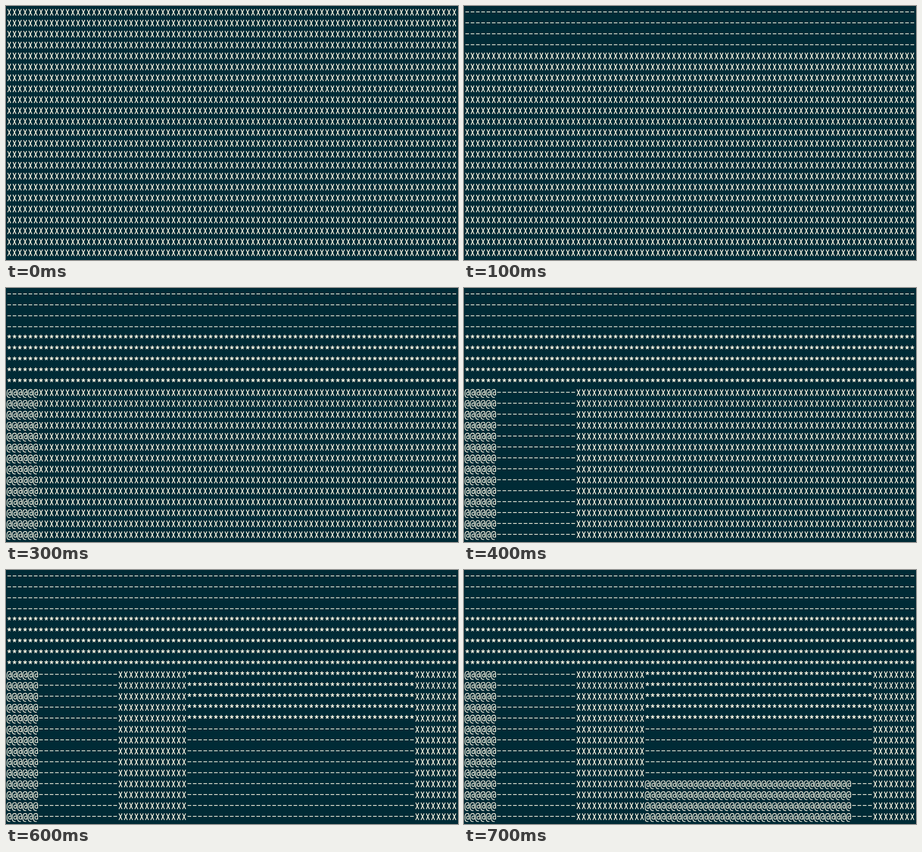
An HTML page with a canvas that plays this animation: 998x561 px, repeating every 1.7 s.

```html
<!DOCTYPE html>
<html lang="en">
<head>
<meta charset="utf-8">
<title>Terminal layout fill</title>
<style>
  html, body { margin: 0; width: 100%; height: 100%; overflow: hidden; background: #002b36; }
  canvas { display: block; }
</style>
</head>
<body>
<canvas id="stage" width="998" height="561"></canvas>
<script>
const ctx = document.getElementById("stage").getContext("2d");
const COLS = 85, ROWS = 23;
const CELL = { x: 7.1, y: 13.8, width: 11.7, height: 24.14 };
const STEP_MS = 100, LOOP_MS = 1700;

// Narrow terminal letterforms, drawn around the centre of a cell.
const glyphs = {
  "X": { width: 1.75, path: "M-3.4-7.2L3.4 7.3M3.4-7.2L-3.4 7.3" },
  "-": { width: 1.7, path: "M-4-.7H4" },
  "*": { width: 1.9, path: "M0-3.1V-7.2M0-3.1L-4-4.4M0-3.1L4-4.4M0-3.1L-2.5.5M0-3.1L2.5.5" },
  "@": { width: 1.6, path: "M4.2 6V-2.5C4.2-5.6 2.8-7 .3-7C-3-7-4.7-4.7-4.7-.8V5C-4.7 8.8-3 10.6.2 10.6H2.2" +
    "M4.2-1.4H2.2C-.3-1.4-1.3-.2-1.3 2C-1.3 4.6-.4 5.6 1.5 5.6C3.1 5.6 4.2 4.5 4.2 2.8" }
};
for (const glyph of Object.values(glyphs)) glyph.path = new Path2D(glyph.path);

// Each step fills one region: character, column, row, columns, rows.
const fills = [
  ["X", 0, 0, COLS, ROWS],
  ["-", 0, 0, COLS, 4],
  ["*", 0, 4, COLS, 5],
  ["@", 0, 9, 6, 14],
  ["-", 6, 9, 15, 14],
  ["-", 34, 9, 43, 14],
  ["*", 34, 9, 43, 5],
  ["@", 34, 19, 39, 4]
];

function layout(lastStep) {
  const grid = Array.from({ length: ROWS }, () => Array(COLS));
  for (const [char, left, top, width, height] of fills.slice(0, lastStep + 1)) {
    for (let row = top; row < top + height; row++) {
      grid[row].fill(char, left, left + width);
    }
  }
  return grid;
}

function draw(step) {
  ctx.fillStyle = "#002b36";
  ctx.fillRect(0, 0, 998, 561);
  ctx.strokeStyle = "#fdf6e3";
  layout(step).forEach((line, row) => line.forEach((char, col) => {
    const { width, path } = glyphs[char];
    ctx.save();
    ctx.translate(CELL.x + col * CELL.width, CELL.y + row * CELL.height);
    ctx.lineWidth = width;
    ctx.stroke(path);
    ctx.restore();
  }));
}

const start = performance.now();
let shown = -1;
function tick() {
  const time = (performance.now() - start) % LOOP_MS;
  const step = Math.min(Math.floor(time / STEP_MS), fills.length - 1);
  if (step !== shown) draw(shown = step);
  requestAnimationFrame(tick);
}
tick();
</script>
</body>
</html>
```
